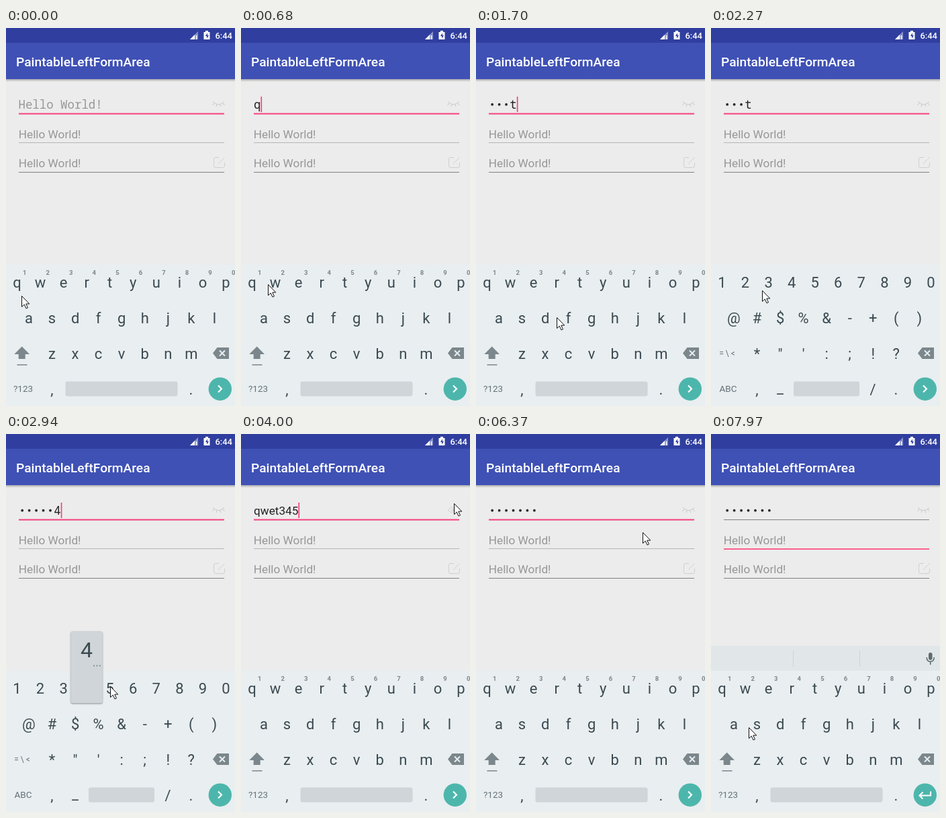
These frames come from a looping animation (341 px wide and 562 px high, 8 s). An HTML page with a canvas:

```html
<!DOCTYPE html>
<html lang="en">
<head>
<meta charset="utf-8">
<title>Password field demo</title>
<style>
html, body { margin: 0; height: 100%; overflow: hidden; background: #ececec; }
canvas { display: block; width: 341px; height: 562px; }
</style>
</head>
<body>
<canvas id="stage"></canvas>
<script>
const W = 341, H = 562, LOOP = 8000;
const canvas = document.getElementById('stage');
const ctx = canvas.getContext('2d');
const dpr = window.devicePixelRatio || 1;
canvas.width = W * dpr;
canvas.height = H * dpr;
ctx.scale(dpr, dpr);

const SANS = 'Roboto, sans-serif', MONO = '"Noto Sans Mono", monospace';
const PINK = '#f7417f', INK = '#3b4a51', GREY = '#7b878c', KEY = '#cfd5d8';
const FIELD_SIZE = 17.2, MONO_SIZE = 17.4, CHAR = 10.45, PITCH = 34.55;

// [time, pointer x, pointer y, state changes]
const steps = [
  [0, 23, 398, { text: '', masked: true, caret: false, popup: '', symbols: false, focus: 1, strip: false }],
  [120, 23, 387],
  [400, 22, 383, { text: 'q', caret: true, popup: 'q' }],
  [520, 24, 382, { popup: '' }],
  [670, 40, 381],
  [790, 52, 382, { text: 'qw', popup: 'w' }],
  [940, 70, 381, { popup: '' }],
  [1070, 86, 381, { text: 'qwe', popup: 'e' }],
  [1220, 144, 381, { popup: '' }],
  [1340, 150, 381],
  [1460, 152, 381, { text: 'qwet', popup: 't' }],
  [1610, 120, 430, { popup: '' }],
  [1730, 60, 500],
  [1850, 25, 537],
  [2000, 25, 538, { symbols: true, caret: false }],
  [2120, 45, 470],
  [2270, 76, 390],
  [2390, 82, 384],
  [2540, 84, 382, { text: 'qwet3', caret: true, popup: '3' }],
  [2660, 100, 381, { popup: '' }],
  [2820, 121, 379, { text: 'qwet34', popup: '4' }],
  [2940, 155, 375],
  [3060, 155, 376, { popup: '' }],
  [3180, 156, 376, { text: 'qwet345', popup: '5' }],
  [3310, 200, 300, { popup: '' }],
  [3440, 290, 160],
  [3570, 317, 103],
  [3720, 317, 103, { caret: false }],
  [4000, 317, 103, { masked: false, caret: true, symbols: false }],
  [4500, 317, 103, { caret: false }],
  [5030, 317, 103, { caret: true }],
  [5160, 317, 106],
  [5310, 318, 109],
  [5460, 319, 110, { caret: false }],
  [5730, 319, 110, { masked: true, caret: true, hideLast: true }],
  [6130, 308, 116],
  [6250, 283, 131, { caret: false }],
  [6370, 248, 146],
  [6520, 225, 150],
  [6660, 206, 152],
  [6790, 197, 153],
  [6940, 195, 153],
  [7060, 195, 153, { focus: 2, caret: true }],
  [7180, 195, 154, { strip: true }],
  [7330, 185, 175],
  [7480, 150, 265],
  [7660, 105, 365, { caret: false }],
  [7820, 72, 420],
  [7970, 56, 436]
];

function stateAt(time) {
  const state = { hideLast: false };
  for (const [start, x, y, changes] of steps) {
    if (start > time) break;
    Object.assign(state, { x, y }, changes);
  }
  return state;
}

function rect(x, y, w, h, color) {
  ctx.fillStyle = color;
  ctx.fillRect(x, y, w, h);
}

function rounded(x, y, w, h, r, color) {
  ctx.fillStyle = color;
  ctx.beginPath();
  ctx.roundRect(x, y, w, h, r);
  ctx.fill();
}

function circle(x, y, r, color) {
  ctx.fillStyle = color;
  ctx.beginPath();
  ctx.arc(x, y, r, 0, 7);
  ctx.fill();
}

function label(text, x, y, size, color, align = 'center', weight = 400, family = SANS) {
  ctx.font = `${weight} ${size}px ${family}`;
  ctx.textAlign = align;
  ctx.fillStyle = color;
  ctx.fillText(text, x, y);
}

function fillPath(d, color) {
  ctx.fillStyle = color;
  ctx.fill(new Path2D(d));
}

function strokePath(d, color, width = 1) {
  ctx.strokeStyle = color;
  ctx.lineWidth = width;
  ctx.stroke(new Path2D(d));
}

function drawBars() {
  rect(0, 0, W, 22, '#303f9f');
  rect(0, 22, W, 54, '#3f51b5');
  const shadow = ctx.createLinearGradient(0, 76, 0, 80);
  shadow.addColorStop(0, 'rgba(0,0,0,.28)');
  shadow.addColorStop(1, 'rgba(0,0,0,0)');
  rect(0, 76, W, 4, shadow);
  fillPath('M274 17 L286 5 V17 Z', '#8791c8');
  fillPath('M274 17 L281 10 V17 Z', '#fff');
  strokePath('M283.5 11 V17', '#fff', 1.5);
  fillPath('M294.5 6 H297 V4 H301 V6 H303.5 V17 H294.5 Z', '#fff');
  fillPath('M300 7.5 L296.8 12 H299 V15.5 L302 11 H300 Z', '#303f9f');
  label('6:44', 337, 16, 13, '#fff', 'right', 500);
  label('PaintableLeftFormArea', 15, 57, 19.2, '#fff', 'left', 500);
}

function drawPassword(state) {
  const { text, masked, hideLast, caret, focus } = state;
  let end = 19;
  if (!text) {
    label('Hello World!', 18.5, 120, MONO_SIZE, '#979797', 'left', 400, MONO);
  } else if (masked) {
    const dots = hideLast ? text.length : text.length - 1;
    for (let i = 0; i < dots; i++) circle(24.2 + i * CHAR, 113.7, 1.9, '#222');
    if (!hideLast) label(text.at(-1), 19 + dots * CHAR, 120, MONO_SIZE, '#222', 'left', 400, MONO);
    end += text.length * CHAR;
  } else {
    label(text, 19, 120, FIELD_SIZE, '#222', 'left');
    end += ctx.measureText(text).width;
  }
  if (caret && focus === 1) rect(end, 102, 1.7, 23, PINK);
}

function drawFields(state) {
  drawPassword(state);
  for (const y of [163.7, 207]) label('Hello World!', 18.8, y, FIELD_SIZE, '#979797', 'left');
  if (state.focus === 1) {
    rect(19, 126.5, 306, 2, PINK);
    rect(19, 170, 306, 1, '#b5b5b5');
  } else {
    rect(19, 127, 306, 1, '#808080');
    rect(19, 170, 306, 2, '#f9608f');
    if (state.caret) rect(19, 145, 1.7, 23, PINK);
  }
  rect(19, 214, 306, 1, '#808080');

  const faint = '#c8c8c8';
  if (state.masked) {
    strokePath('M308 109.5 Q316.5 118 325 109.5 M310 112 L307.5 115 M314 114 L313 117 M319 114 L320 117 M323 112 L325.5 115', faint);
  } else {
    strokePath('M308 113 Q316.5 104 325 113 Q316.5 121 308 113', '#d2d2d2');
    circle(316.5, 113, 2.5, '#d2d2d2');
  }
  strokePath('M317 192.5 H312 Q309.5 192.5 309.5 195 V205 Q309.5 207.5 312 207.5 H323 Q325.5 207.5 325.5 205 V200 M316 202 L325.5 192.5', '#d0d0d0');
}

function drawKeyRow(chars, x, baseline) {
  [...chars].forEach((char, i) => label(char, x + i * PITCH, baseline, 22, INK));
}

function drawKeyboard({ symbols, strip, focus }) {
  rect(0, 352, W, H - 352, '#e9eef0');
  if (strip) {
    rect(0, 315, W, 37, '#e1e6e9');
    for (const x of [122, 221]) rect(x, 322, 1, 24, '#ced4d7');
    rounded(324, 325, 5.5, 11, 2.75, '#5f6b70');
    strokePath('M321.2 332 Q321.2 338.5 326.7 338.5 Q332.2 338.5 332.2 332 M326.7 338 V343', '#5f6b70', 1.6);
  }

  drawKeyRow(symbols ? '1234567890' : 'qwertyuiop', 16.5, 386.3);
  drawKeyRow(symbols ? '@#$%&-+()' : 'asdfghjkl', 34, 439);
  drawKeyRow(symbols ? '*"\':;!?' : 'zxcvbnm', 68.5, 491.8);
  if (symbols) {
    label('= \\ <', 24, 488, 12, '#65727a');
    label('_', 103, 542.5, 22, INK);
    label('/', 241, 545, 22, INK);
    rounded(123, 525.5, 98, 22, 3, KEY);
  } else {
    [...'1234567890'].forEach((digit, i) => label(digit, 27.7 + i * PITCH, 367, 9.5, GREY, 'center', 700));
    fillPath('M23.7 473.5 L35 485 H28.7 V492 H18.7 V485 H12.3 Z', GREY);
    rect(16.5, 500, 15, 1.5, GREY);
    rounded(88.5, 525.5, 167, 22, 3, KEY);
  }
  label(symbols ? 'ABC' : '?123', 25.5, 541.3, 13.5, '#65727a');
  label(',', 68.5, 545, 22, INK);
  label('.', 275.5, 545, 22, INK);

  fillPath('M308 483.5 L314.5 475 H332 V492 H314.5 Z', GREY);
  strokePath('M318 479.5 L326 487.5 M326 479.5 L318 487.5', '#e9eef0', 1.9);
  circle(318.8, 536.7, 17.2, '#4db6ac');
  const enter = focus === 2 && strip
    ? 'M327 531.5 V537.5 H311 M315.5 532.5 L310.5 537.5 L315.5 542.5'
    : 'M316 531.5 L321 536.5 L316 541.5';
  strokePath(enter, '#fff', 2.1);
}

function drawPopup({ popup, symbols }) {
  if (!popup) return;
  const column = (symbols ? '1234567890' : 'qwertyuiop').indexOf(popup);
  const x = Math.max(2, Math.round(16.5 + column * PITCH - 24));
  ctx.save();
  ctx.shadowColor = 'rgba(0,0,0,.4)';
  ctx.shadowBlur = 2 * dpr;
  ctx.shadowOffsetY = dpr;
  rounded(x + 0.3, 293.3, 47.5, 107, 3, KEY);
  ctx.restore();
  label(popup, x + 24, 331.5, 32, INK);
  for (let i = 0; i < 3; i++) rect(x + 34 + i * 4.5, 343.5, 2, 2, '#89949a');
}

function drawPointer({ x, y }) {
  ctx.save();
  ctx.translate(x + 0.5, y + 0.5);
  const arrow = 'M0 0 V16 L3.8 12.6 L6.5 18.5 L9 17.4 L6.3 11.6 H11.3 Z';
  fillPath(arrow, '#fff');
  strokePath(arrow, '#111');
  ctx.restore();
}

function draw(now) {
  const state = stateAt(now % LOOP);
  rect(0, 0, W, H, '#ececec');
  drawBars();
  drawFields(state);
  drawKeyboard(state);
  drawPopup(state);
  drawPointer(state);
}

const start = performance.now();
function tick() {
  draw(performance.now() - start);
  requestAnimationFrame(tick);
}
tick();
</script>
</body>
</html>
```
